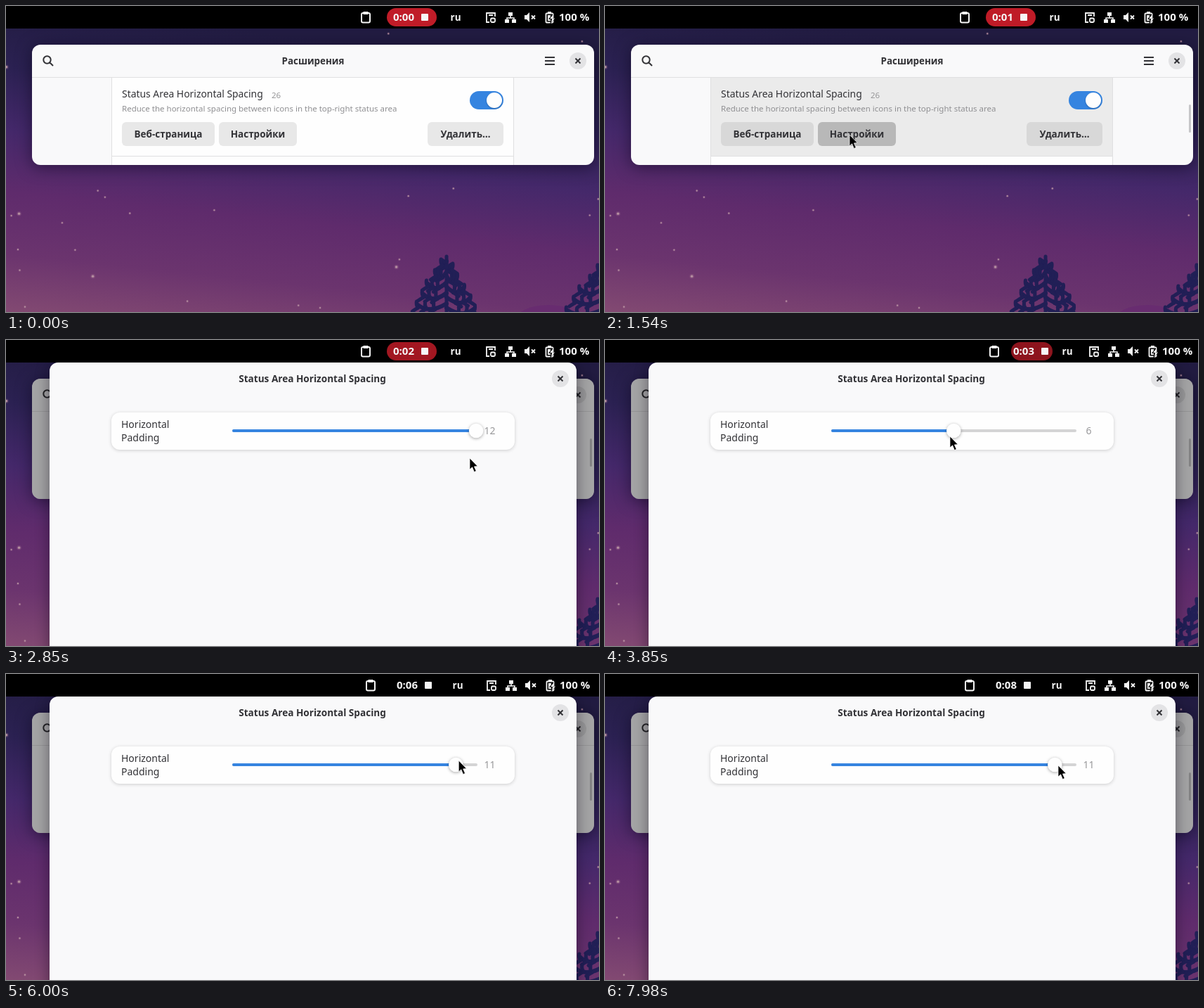
An HTML page with a canvas that plays this animation: 844 px wide and 435 px high, repeating every 8000 ms.

```html
<!DOCTYPE html>
<html lang="ru">
<head>
<meta charset="utf-8">
<style>
html, body { margin: 0; width: 100%; height: 100%; overflow: hidden; background: #000; }
canvas { display: block; width: 844px; height: 435px; }
</style>
</head>
<body>
<canvas id="stage" width="844" height="435"></canvas>
<script>
const W = 844, H = 435, LOOP = 8000;
const ctx = document.getElementById('stage').getContext('2d');
const FONT = '"Noto Sans", "Open Sans", sans-serif';
const INK = '#323236', PANE = '#f9f9fa', CARD = '#fefefe', EDGE = '#e0e0e1';
const BAR = '#f6f6f6', BLUE = '#3584e0', RED = '#c01c28', TREE = '#211f56';

const clamp = (v, a = 0, b = 1) => Math.min(b, Math.max(a, v));
const easeOut = u => 1 - (1 - clamp(u)) ** 2;

function seeded(seed) {
  return () => (seed = (seed * 16807) % 2147483647) / 2147483647;
}

function rect(x, y, w, h, fill, c = ctx) {
  c.fillStyle = fill;
  c.fillRect(x, y, w, h);
}

function box(x, y, w, h, r, fill) {
  ctx.beginPath();
  ctx.roundRect(x, y, w, h, r);
  ctx.fillStyle = fill;
  ctx.fill();
}

function outline(x, y, w, h, r, width = 1.8) {
  ctx.beginPath();
  ctx.roundRect(x, y, w, h, r);
  ctx.strokeStyle = BAR;
  ctx.lineWidth = width;
  ctx.stroke();
}

function disc(x, y, r, fill, c = ctx) {
  c.beginPath();
  c.arc(x, y, r, 0, Math.PI * 2);
  c.fillStyle = fill;
  c.fill();
}

function shadowed(color, blur, dy, paint) {
  ctx.save();
  ctx.shadowColor = color;
  ctx.shadowBlur = blur;
  ctx.shadowOffsetY = dy;
  paint();
  ctx.restore();
}

function text(s, x, y, size, color = INK, weight = 400, align = 'left') {
  ctx.font = `${weight} ${size}px ${FONT}`;
  ctx.textAlign = align;
  ctx.fillStyle = color;
  ctx.fillText(s, x, y);
}

function shape(path, x, y, fill) {
  ctx.save();
  ctx.translate(x, y);
  ctx.fillStyle = fill;
  ctx.fill(new Path2D(path));
  ctx.restore();
}

function strokes(path, x, y, color, width) {
  ctx.save();
  ctx.translate(x, y);
  ctx.strokeStyle = color;
  ctx.lineWidth = width;
  ctx.stroke(new Path2D(path));
  ctx.restore();
}

function cross(x, y, r, color, width) {
  strokes(`M${-r} ${-r}L${r} ${r}M${r} ${-r}L${-r} ${r}`, x, y, color, width);
}

// Pine with drooping boughs whose tips curl up into short leaves
function tree(c, x, top, spread) {
  const rnd = seeded(11);
  c.strokeStyle = TREE;
  c.lineCap = 'round';
  const limb = (width, x0, y0, qx, qy, x1, y1) => {
    c.lineWidth = width;
    c.beginPath();
    c.moveTo(x0, y0);
    c.quadraticCurveTo(qx, qy, x1, y1);
    c.stroke();
  };
  limb(5, x, top + 2, x, H, x, H + 5);
  for (let i = 0; i < 6; i++) {
    for (const s of [-1, 1]) {
      const y = top + 12 + i * 15 + s * 3;
      const reach = (7 + i * spread) * (0.85 + 0.3 * rnd());
      limb(6, x, y, x + s * reach * 0.6, y + 15, x + s * reach, y + 2);
      for (let u = 0.4; u <= 1; u += 0.3) {
        const bx = x + s * reach * u, by = y + 6 + 4 * (1 - u);
        limb(5, bx, by, bx + s * 3, by - 4, bx + s * 2, by - 9);
        limb(5, bx, by, bx + s * 5, by + 3, bx + s * 8, by + 5);
      }
    }
  }
}

function paintSky() {
  const layer = document.createElement('canvas');
  layer.width = W;
  layer.height = H;
  const c = layer.getContext('2d');
  const g = c.createLinearGradient(0, 0, -45, 436);
  ['#221c42', '#2b2152', '#44286a', '#5f2b6c', '#6b346e', '#844b72']
    .forEach((col, i, all) => g.addColorStop(i / (all.length - 1), col));
  rect(0, 0, W, H, g, c);
  const rnd = seeded(77);
  for (let i = 0; i < 34; i++) {
    const x = rnd() * W, y = 36 + rnd() * 395, r = i % 10 ? 1.1 : 1.8;
    disc(x, y, r * 1.8, 'rgba(200,150,170,.2)', c);
    disc(x, y, r, '#b58fa0', c);
  }
  c.beginPath();
  c.ellipse(772, 446, 46, 21, 0, 0, 7);
  c.fillStyle = '#682c70';
  c.fill();
  tree(c, 627, 354, 8.5);
  tree(c, 850, 362, 11);
  return layer;
}
const sky = paintSky();

function closeButton(x, y) {
  disc(x, y, 12, '#e3e3e5');
  cross(x, y, 3.5, INK, 2);
}

function statusIcons(x) {
  // rotating screen
  strokes('M-6 15V10H6V15M-6 14V23H-2M-3 13H3', x, 0, BAR, 1.8);
  outline(x, 17.5, 6, 5.5, 1.5);
  // wired network
  for (const [dx, y] of [[0, 9], [-5, 19], [5, 19]]) rect(x + 25 + dx, y, 6, 5, BAR);
  strokes('M0 13V17M-5 20V17H5V20', x + 28, 0, BAR, 1.6);
  // muted speaker
  shape('M-8 13H-5L-1 9V23L-5 19H-8Z', x + 56, 0, BAR);
  cross(x + 60.5, 16, 2.5, BAR, 1.8);
  // charging battery
  rect(x + 81, 8, 5, 3, BAR);
  outline(x + 78.5, 10.5, 10, 13, 1);
  rect(x + 81, 13, 4, 8, BAR);
  shape('M4 11L-2 19H2L0 26L8 17H4Z', x + 84, 0, '#000');
  shape('M4 13L0 18H3L2 24L7 17.5H4Z', x + 84, 0, BAR);
}

// Every indicator shifts right as the padding shrinks
function topBar(t, pad) {
  const d = 12 - pad, clip = 512 + 7 * d, rec = 551 + 5 * d;
  rect(0, 0, W, 32, '#000');
  outline(clip - 6, 10, 12, 13.5, 2, 2);
  rect(clip - 3.5, 8, 7, 4, BAR);

  ctx.globalAlpha = t < 5550 ? clamp(1 - (t - 1500) / 8800) : 0;
  box(rec - pad + 3, 3, 47 + 2 * pad, 26, 13, RED);
  ctx.globalAlpha = 1;
  text('0:0' + Math.floor((t + 115) / 1000), rec, 21, 15, BAR, 600);
  box(rec + 40, 11, 10, 10, 1, BAR);

  text('ru', 640 + 3 * d, 21, 13.5, BAR, 600, 'center');
  statusIcons(690 + d);
  text('100 %', 787 + d, 21, 15, BAR, 600);
}

function button(label, x, w, fill) {
  box(x, 165, w, 34, 6, fill);
  text(label, x + w / 2, 187, 13.5, INK, 600, 'center');
}

function mainWindow(t, mx, my) {
  const seen = t > 500;
  const inRow = seen && mx > 150 && mx < 723 && my > 101 && my < 213;
  const onButton = inRow && mx > 303 && mx < 414 && my > 165 && my < 199;
  const plain = inRow ? '#d8d8d8' : '#e8e8e8';

  shadowed('rgba(8,4,20,.5)', 22, 3, () => box(37, 55, 800, 171, 12, PANE));
  strokes('M3.5 3.5L8.5 8.5M5.2 0A5.2 5.2 0 1 1 -5.2 0A5.2 5.2 0 1 1 5.2 0', 58.5, 76.5, INK, 2);
  text('Расширения', 437, 83, 13.4, INK, 600, 'center');
  for (let i = 0; i < 3; i++) rect(767, 72 + 5 * i, 14, 2, INK);
  closeButton(814, 78);

  rect(37, 101, 800, 1, EDGE);
  rect(150, 102, 573, 124, EDGE);
  rect(151, 102, 571, 124, CARD);
  if (inRow) rect(151, 102, 571, 111, '#ebebeb');
  rect(151, 213, 571, 1, EDGE);

  text('Status Area Horizontal Spacing', 165, 130, 13.9);
  text('26', 378, 131, 11.5, '#969698');
  text('Reduce the horizontal spacing between icons in the top-right status area', 165, 150, 11.5, '#8f8f92');
  button('Веб-страница', 165, 132, plain);
  button('Настройки', 303, 111, onButton ? (t > 1480 ? '#b8b8b8' : '#cccccc') : plain);
  button('Удалить…', 600, 108, plain);
  box(660, 121, 48, 26, 13, BLUE);
  shadowed('rgba(0,0,0,.25)', 2, 1, () => disc(695, 134, 11, CARD));
  if (seen) box(831, 140, 3, 40, 1.5, '#c6c6c8');
}

function slider(pad) {
  const kx = 323.5 + 28.8 * pad;
  box(322, 127, 349, 4, 2, '#d4d4d5');
  box(322, 127, kx - 322, 4, 2, BLUE);
  shadowed('rgba(0,0,0,.35)', 4, 1, () => disc(kx, 129, 10.3, CARD));
  text(pad, 688.5, 134, 14, '#98989a', 400, 'center');
}

const OPEN = 1825, MID = 292;

// Unfolds vertically around its middle while the window behind dims
function dialog(t, pad) {
  if (t <= OPEN) return;
  const dim = 0.34 * easeOut((t - OPEN) / 180);
  box(37, 55, 800, 171, 12, `rgba(0,0,0,${dim})`);

  ctx.save();
  ctx.translate(0, MID);
  ctx.scale(1, easeOut((t - OPEN) / 100));
  ctx.translate(0, -MID);
  shadowed('rgba(8,4,20,.45)', 20, 3, () => box(62, 32, 750, 520, 12, PANE));
  text('Status Area Horizontal Spacing', 436, 60, 13.6, INK, 600, 'center');
  closeButton(789, 55);
  shadowed('rgba(0,0,0,.18)', 5, 1, () => box(150, 103, 574, 53, 12, CARD));
  text('Horizontal', 164, 125, 14);
  text('Padding', 164, 144, 14);
  slider(pad);
  ctx.restore();
}

// Pointer moves: start, end, x, y; it rests in between
const MOVES = [
  [500, 1500, 348, 183],
  [2510, 2850, 660, 168],
  [3050, 3200, 670, 136],
  [3200, 3850, 491, 137],
  [3890, 4600, 314, 134],
  [4730, 5200, 428, 117],
  [5200, 6000, 644, 123],
  [6000, 6340, 728, 118],
  [6540, 7300, 308, 139],
  [7370, 7980, 645, 130]
];

function pointerAt(t) {
  let x = 470, y = 436;
  for (const [from, to, tx, ty] of MOVES) {
    const u = clamp((t - from) / (to - from));
    x += (tx - x) * u;
    y += (ty - y) * u;
  }
  return [x, y];
}

function pointer(x, y) {
  const arrow = 'M0 0V16L3.6 12.8L6.4 19.5L9.2 18.3L6.4 11.9L11.2 11.5Z';
  shape(arrow, x, y, '#000');
  strokes(arrow, x, y, 'rgba(255,255,255,.75)', 0.9);
}

function draw(t) {
  const [mx, my] = pointerAt(t);
  const pad = t < 3200 ? 12 : clamp(Math.round((mx - 327.5) / 28.8), 0, 12);
  ctx.drawImage(sky, 0, 0);
  mainWindow(t, mx, my);
  dialog(t, pad);
  topBar(t, pad);
  if (t >= 500) pointer(mx, my);
}

const start = performance.now();
function tick(now) {
  draw(Math.max(0, now - start) % LOOP);
  requestAnimationFrame(tick);
}
draw(0);
requestAnimationFrame(tick);
</script>
</body>
</html>
```
